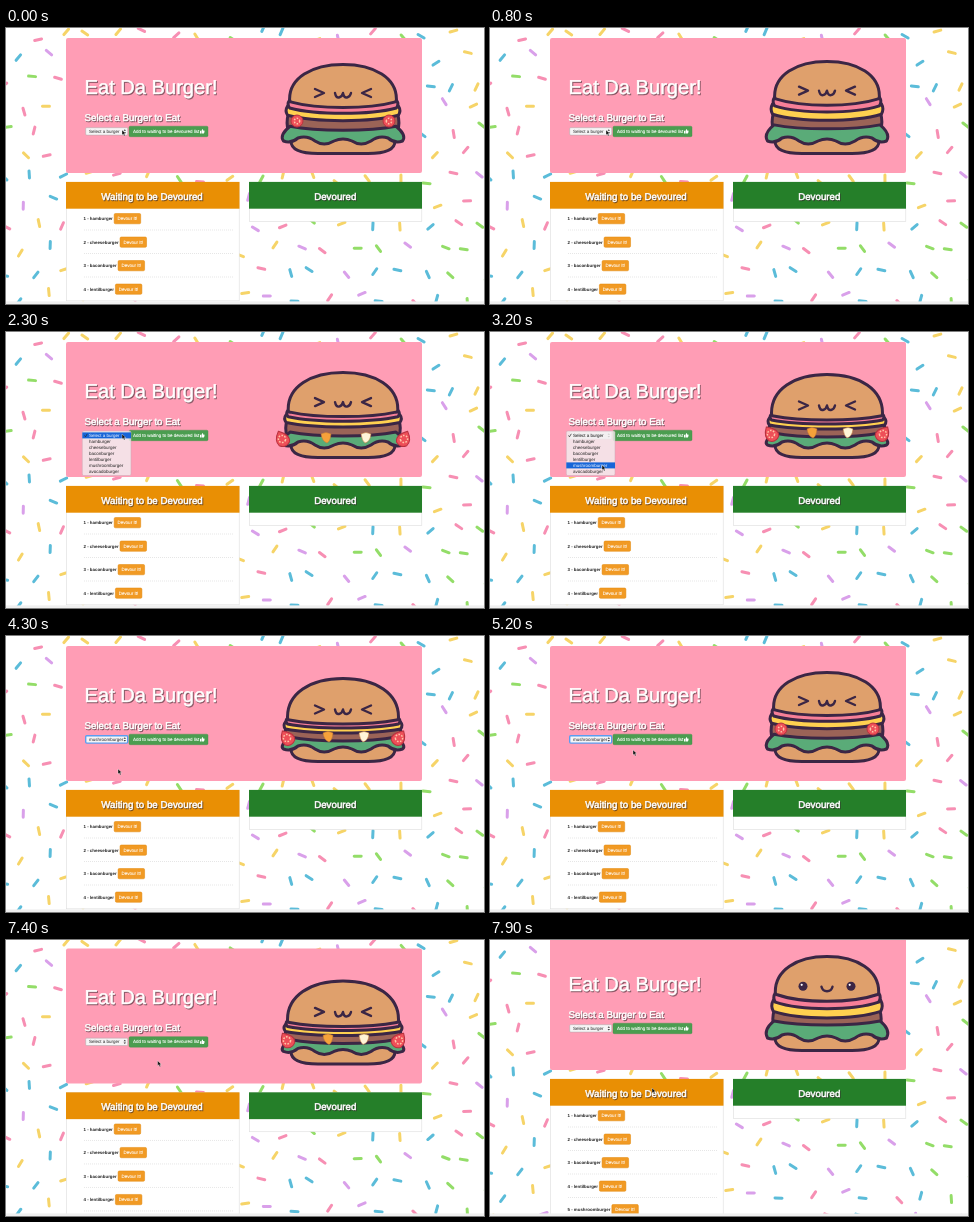
An HTML page for the animation above (8000 ms loop, 478 by 276 pixels).

```html
<!DOCTYPE html>
<html lang="en">
<head>
<meta charset="utf-8">
<title>Eat Da Burger!</title>
<style>
html, body { margin: 0; width: 100%; height: 100%; overflow: hidden; background: #fff; }
svg { display: block; width: 100vw; height: 100vh; }
text { font-family: "Liberation Sans", Arial, sans-serif; font-size: 4.5px; fill: #222; white-space: pre; text-rendering: geometricPrecision; }
.title { font-size: 20.1px; }
.head { font-size: 9.75px; }
.title, .head { fill: #fff; stroke: #fff; stroke-width: .5; }
.shade { fill: #33252b; stroke: #33252b; opacity: .6; }
.bold { font-weight: bold; font-size: 4.4px; }
.light { fill: #fff; stroke: #fff; stroke-width: .1; }
.ink { stroke: #3b2645; stroke-width: 3; stroke-linejoin: round; stroke-linecap: round; }
.line { fill: none; stroke: #3b2645; stroke-width: 2.4; stroke-linejoin: round; stroke-linecap: round; }
</style>
</head>
<body>
<svg viewBox="0 0 478 276">
  <defs><clipPath id="heroClip"><rect x="60" y="10" width="356" height="129"/></clipPath></defs>
  <rect width="478" height="276" fill="#fff"/>
  <g id="page">
    <g id="sprinkles" stroke-width="3" stroke-linecap="round"></g>
    <rect x="60" y="10" width="356" height="135" rx="2" fill="#ff9db5"/>
    <g id="heroText"></g>
    <rect id="select" x="79.7" y="99.7" width="42" height="7.4" rx="1" fill="#f6f5f6"/>
    <text id="choice" x="83" y="105"></text>
    <path d="M117.6 102.8l1.2-1.6 1.2 1.6zM117.6 104l1.2 1.6 1.2-1.6z" fill="#333"/>
    <rect id="add" x="123" y="98.2" width="79" height="10.5" rx="1.3"/>
    <text class="light" x="127" y="105">Add to waiting to be devoured list</text>
    <path d="M194 102.8h1v2.6h-1zM195.4 102.9l1.1-1.9q.9 0 .5 1.6h1.4q.6 1.6-.6 2.9h-2.4z" fill="#fff"/>
    <g id="burger" clip-path="url(#heroClip)"></g>

    <rect id="card" x="60.3" y="154.3" width="172.9" fill="#fff" stroke="#ddd" stroke-width=".6"/>
    <rect x="60" y="153.9" width="173.5" height="26.8" fill="#e98f04"/>
    <g id="rows"></g>
    <rect x="243.3" y="154.3" width="172.5" height="39" fill="#fff" stroke="#ddd" stroke-width=".6"/>
    <rect x="243" y="153.9" width="173" height="26.8" fill="#257f29"/>
    <g id="cardText"></g>
  </g>
  <rect y="273.4" width="478" height="2.6" fill="#efefef"/>
  <rect id="status" x="-1" y="271" width="139" height="6" fill="#ececec" stroke="#bbb" stroke-width=".6"/>
  <g id="menu"></g>
  <path id="cursor" d="M0 0v5l1.2-1 .9 1.9 1-.5-.9-1.8h1.6z" fill="#111" stroke="#fff" stroke-width=".35"/>
</svg>
<script>
const $ = id => document.getElementById(id);
const set = (id, attrs) => { for (const k in attrs) $(id).setAttribute(k, attrs[k]); };
const show = (id, on) => set(id, { visibility: on ? 'visible' : 'hidden' });
const burgers = ['hamburger', 'cheeseburger', 'baconburger', 'lentilburger', 'mushroomburger', 'avocadoburger'];
const prompt = 'Select a burger';

// Confetti on a jittered brick grid
let seed = 41;
const random = () => (seed = seed * 16807 % 2147483647) / 2147483647;
const hues = ['#5bbcd9', '#f78fb3', '#f6d468', '#93dd68', '#d9a0ea', '#f6d468', '#f78fb3', '#5bbcd9'];
let confetti = '';
for (let row = 0; row < 13; row++) {
  for (let col = 0; col < 18; col++) {
    const x = col * 28 + row % 2 * 14 + random() * 12 - 6;
    const y = row * 24 + 6 + random() * 12 - 6;
    const a = random() * Math.PI, dx = 3.5 * Math.cos(a), dy = 3.5 * Math.sin(a);
    const hue = hues[Math.floor(random() * hues.length)];
    confetti += `<path d="M${x - dx} ${y - dy}L${x + dx} ${y + dy}" stroke="${hue}"/>`;
  }
}
$('sprinkles').innerHTML = confetti;

// White heading over a soft dark copy
const heading = (label, x, y, kind, anchor = 'start') =>
  `<text class="${kind} shade" x="${x + .8}" y="${y + .8}" text-anchor="${anchor}">${label}</text>
   <text class="${kind}" x="${x}" y="${y}" text-anchor="${anchor}">${label}</text>`;
$('heroText').innerHTML = heading('Eat Da Burger!', 78.6, 66, 'title') + heading('Select a Burger to Eat', 78.5, 93, 'head');
$('cardText').innerHTML = heading('Waiting to be Devoured', 146, 172, 'head', 'middle') + heading('Devoured', 329.3, 172, 'head', 'middle');

$('rows').innerHTML = burgers.slice(0, 5).map((name, i) => {
  const y = 190.5 + i * 23.5;
  return `<g id="row${i}"><text class="bold" x="77.5" y="${y + 1.6}">${i + 1} - ${name}</text>
    <g id="devour${i}"><rect y="${y - 5}" width="26.5" height="10.3" rx="1.3" fill="#f19a24" stroke="#e18405" stroke-width=".5"/>
    <text class="light" x="13.2" y="${y + 1.8}" text-anchor="middle">Devour It!</text></g>
    ${i ? `<path d="M78 ${y - 12}H227" stroke="#ccc" stroke-width=".5" stroke-dasharray="1 1"/>` : ''}</g>`;
}).join('');
burgers.slice(0, 5).forEach((_, i) => {
  const end = 77.5 + $('row' + i).querySelector('text').getComputedTextLength();
  set('devour' + i, { transform: `translate(${end + 1.4} 0)` });
});

$('menu').innerHTML = '<rect x="76.3" y="99" width="48.7" height="44.5" rx="1.5" fill="#f3eff1" fill-opacity=".82" stroke="#c9a9b4" stroke-width=".5"/>' +
  [prompt, ...burgers].map((name, i) => `<rect id="bar${i}" x="76.3" y="${100.4 + i * 6}" width="48.7" height="6" fill="#1765d8"/>
    <text id="item${i}" x="83" y="${105 + i * 6}">${name}</text>`).join('') +
  '<path d="M78.5 103.5l1 1.3 1.8-3" fill="none" stroke="#222" stroke-width=".7"/>';

const middle = 337;
const bunTops = [35, 41, 39, 36, 31, 28, 29, 30, 31, 32, 32, 33, 34];
// Offset from the middle, height and radius of the tomato slices
const tomatoes = { 0: [46, 93, 6], 1: [56, 102, 8], 2: [61, 107, 8], 3: [64, 115, 8], 4: [68, 132, 8],
  11: [40, 90, 5], 12: [43, 92, 5.5] };

function tomato(side, [dx, y, r], loose, frame) {
  const body = loose
    ? `<path d="M${-r * .7} ${-r * .8}Q${r * .9} ${-r * .8} ${r} ${r * .1}Q${r * .8} ${r} ${-r * .1} ${r * .9}Q${-r * .9} ${r * .5} ${-r * .7} ${-r * .8}z" fill="#ee4f58" stroke="#b8323f"/>`
    : `<circle r="${r}" fill="#ee4f58" stroke="#b8323f"/>`;
  return `<g transform="translate(${middle + side * dx} ${y}) scale(${-side} 1) rotate(${frame * 8 % 40})">${body}
    <circle r="${r * .45}" fill="none" stroke="#ffc5a8" stroke-width="1.5" stroke-dasharray="1.6 1.4"/></g>`;
}

// A layer whose edges hang lower in the middle than at the sides
const sagging = (half, y, sag, dir) =>
  `C${middle - dir * half * .5} ${y + sag / 3} ${middle + dir * half * .5} ${y + sag / 3} ${middle + dir * half} ${y - sag}`;
const layer = (half, y0, y1, sag, fill) => `<path class="ink" fill="${fill}" d="M${middle - half} ${y0 - sag}${sagging(half, y0, sag, 1)}
  q3 ${(y1 - y0) / 2} 0 ${y1 - y0}${sagging(half, y1, sag, -1)}q-3 ${(y0 - y1) / 2} 0 ${y0 - y1}z"/>`;

function topBun(half, top, base, sag) {
  const shoulder = base - sag - 3, rise = (shoulder - top) * .6, run = half * .6;
  const left = middle - half, right = middle + half;
  return `<path class="ink" fill="#dfa06c" d="M${left} ${shoulder}C${left} ${shoulder - rise} ${middle - run} ${top} ${middle} ${top}
    S${right} ${shoulder - rise} ${right} ${shoulder}q0 3-2 3${sagging(half - 2, base, sag, -1)}q-2 0-2-3z"/>`;
}

function drawBurger(frame) {
  const top = bunTops[frame] + 1.5, k = (bunTops[frame] - 28) / 13;
  const half = 51 + 4.5 * k, sag = 7 - 3 * k;
  const base = 76 + 12 * k * k;
  const sauce = base + 8 - 4 * k, cheese = sauce + 10 - 5 * k;
  const leaf = 97 + 6 * k;
  const squint = frame < 5 || frame > 9;
  const spot = tomatoes[frame];
  const loose = frame > 0 && frame < 5;
  const pair = spot ? tomato(-1, spot, loose, frame) + tomato(1, spot, loose, frame) : '';
  const drops = loose
    ? [[-1, '#f6a13a'], [1, '#fff4d8']].map(([side, fill]) =>
      `<path transform="translate(${340 + side * (16 + 2 * frame)} ${spot[1] - 1})" d="M-5-4Q0-7 5-4Q4 4 ${-side} 5Q-4 3-5-4z" fill="${fill}" stroke="#c47a35" stroke-width=".5"/>`).join('')
    : '';
  const eye = squint ? base - 14.5 : base - 15, gap = 24;
  const face = squint
    ? `<path class="line" d="M${middle - gap - 4} ${eye - 4}l9 4-9 4M${middle + gap + 4} ${eye - 4}l-9 4 9 4M329 ${eye}q1 5 4 4.5t4-4.5q1 5 4 4.5t4-4.5"/>`
    : [-gap, gap].map(dx => `<circle cx="${middle + dx}" cy="${eye}" r="4.5" fill="#3b2645"/>
        <circle cx="${middle + dx - 1.3}" cy="${eye - 1.5}" r="1.1" fill="#fff"/>`).join('') +
      `<path class="line" d="M331.5 ${eye + .5}q1 4.5 5.5 4.5t5.5-4.5"/>`;
  $('burger').innerHTML = `
    <path class="ink" fill="#dfa06c" d="M285 106H389V113C389 124 374 125.5 362 125.5H312C300 125.5 285 124 285 113z"/>
    ${layer(half + 1, cheese - 4, 107, sag * .6, '#9b6357')}
    <path class="ink" fill="#5aab78" d="M284 ${leaf - 2}Q273 ${leaf + 7} 277.5 113Q285 116 292 110Q301 107 309 113Q318 119 328 113Q337 109 346 113Q355 119 365 113Q373 107 382 110Q389 116 396.5 113Q401 ${leaf + 7} 390 ${leaf - 2}${sagging(53, leaf + 2, 4, -1)}z"/>
    ${layer(half + 2, sauce - 2, cheese, sag, '#ffd050')}
    ${loose ? '' : pair}
    ${layer(half, base - 2, sauce, sag, '#f77f98')}
    ${topBun(half, top, base, sag)}
    ${face}${loose ? pair : ''}${drops}`;
}

const pointer = [[0, 116, 102], [2300, 116, 102], [3000, 112, 133], [4500, 112, 133], [5200, 143, 114],
  [5600, 143, 114], [6100, 146, 106], [7200, 146, 106], [7700, 162, 148], [8000, 162, 148]];

function follow(track, t) {
  const i = track.findIndex(key => key[0] > t);
  const a = track[i - 1], b = track[i];
  const u = (t - a[0]) / (b[0] - a[0]), e = u * u * (3 - 2 * u);
  return [a[1] + (b[1] - a[1]) * e, a[2] + (b[2] - a[2]) * e];
}

function render(t) {
  const [x, y] = follow(pointer, t);
  const reloaded = t >= 7200;
  const open = t >= 2100 && t < 3700;
  const scroll = follow([[0, 0, 0], [7300, 0, 0], [7800, 0, 15], [8000, 0, 15]], t)[1];
  const focused = t >= 3700 && t < 6300;
  const pressed = t >= 6300 && !reloaded;
  const hover = x > 123 && y > 98 && y < 109;

  set('page', { transform: `translate(0 ${-scroll})` });
  set('cursor', { transform: `translate(${x} ${y})` });
  $('choice').textContent = t >= 3700 && !reloaded ? burgers[4] : prompt;
  set('select', { stroke: focused ? '#5b9df0' : '#aaa', 'stroke-width': focused ? 1.4 : .5 });
  set('add', { fill: hover ? '#257f2d' : '#4b9d50', stroke: pressed ? '#4d8fc0' : '#3f8f45', 'stroke-width': pressed ? 1.2 : .4 });
  show('status', pressed);
  show('row4', reloaded);
  set('card', { height: reloaded ? 142 : 118.5 });

  set('menu', { display: open ? 'inline' : 'none' });
  const active = Math.max(0, Math.min(6, Math.floor((y - 100.4) / 6)));
  for (let i = 0; i < 7; i++) {
    set('bar' + i, { display: i === active ? 'inline' : 'none' });
    $('item' + i).style.fill = i === active ? '#fff' : '#222';
  }
  drawBurger(Math.floor(t % 1040 / 80));
}

const start = performance.now();
function tick() {
  const t = (performance.now() - start) % 8000;
  render(Math.floor(t / 100) * 100);
  requestAnimationFrame(tick);
}
tick();
</script>
</body>
</html>
```
